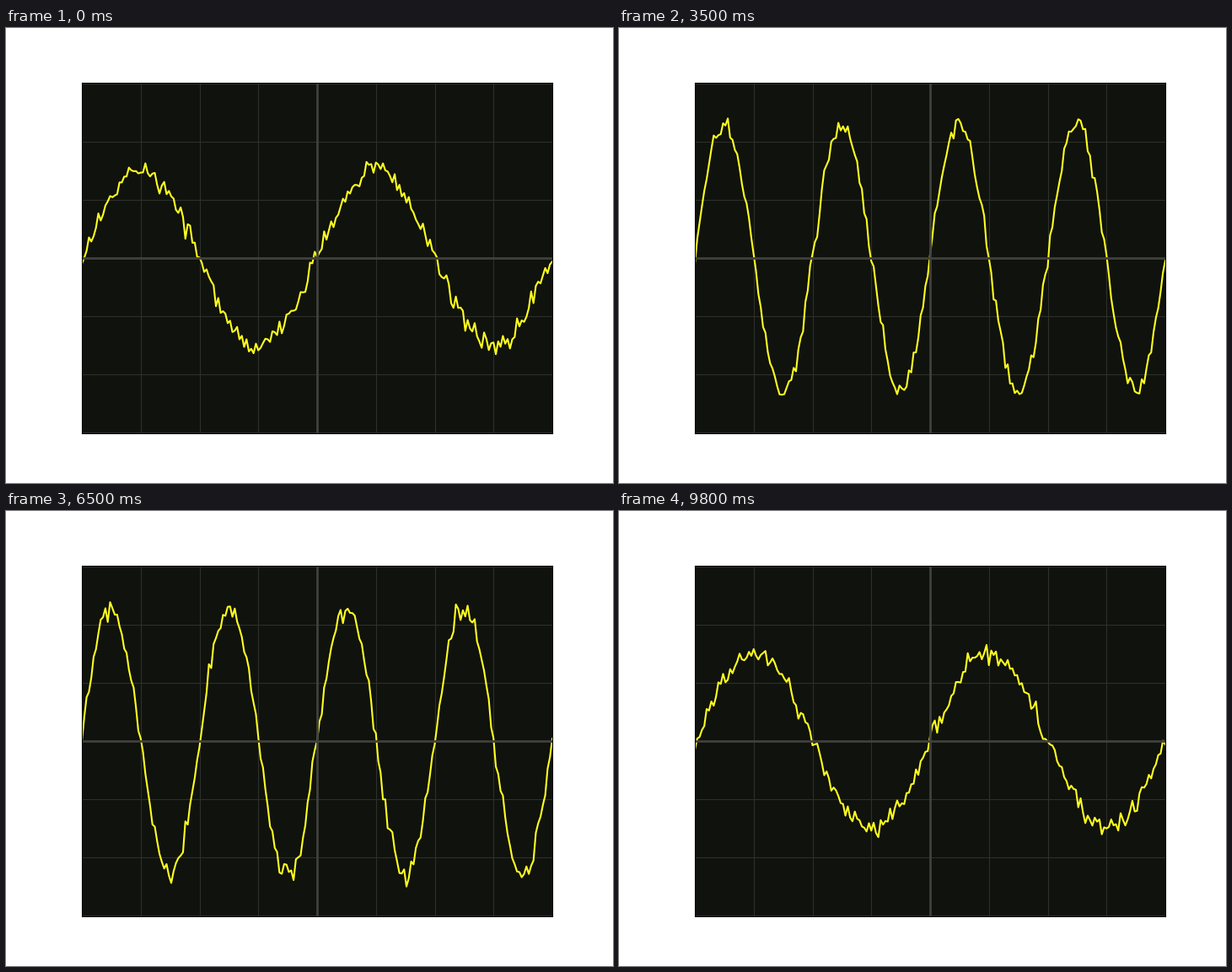
Recreate the animation shown at these times as a matplotlib script. Size 720 by 540 pixels, loop 9.9 s.

```python
import numpy as np
import matplotlib.pyplot as plt
from matplotlib.animation import FuncAnimation

FRAMES = 99
PERIOD = 100      # frames in one swell of the amplitude
NOISE = 0.09
Y_LIMIT = 3.013   # leaves the outer grid lines just inside the border

SCREEN = "#10120d"
GRID = "#2e302c"
AXIS = "#40413d"
TRACE = "#ffff20"

x = np.linspace(-4, 4, 201)


def signal(frame):
    amplitude = 2 - 0.5 * np.cos(2 * np.pi * frame / PERIOD)
    cycles = 4 if 25 <= frame < 75 else 2
    noise = np.random.default_rng(frame + 40).normal(0, NOISE, x.size)
    return amplitude * np.sin(2 * np.pi * cycles * x / 8) + noise


fig, ax = plt.subplots(figsize=(7.2, 5.4), dpi=100, facecolor="white")
fig.subplots_adjust(left=0.125, right=0.9, bottom=0.11, top=0.88)
ax.set_facecolor(SCREEN)
ax.set(xlim=(-4, 4), ylim=(-Y_LIMIT, Y_LIMIT),
       xticks=range(-4, 5), yticks=range(-3, 4))
ax.tick_params(length=0, labelbottom=False, labelleft=False)
ax.grid(color=GRID, linewidth=0.8)
ax.set_axisbelow(True)

trace, = ax.plot(x, signal(0), color=TRACE, linewidth=1.5)

# The centre cross lies over the trace.
ax.axhline(0, color=AXIS, linewidth=2)
ax.axvline(0, color=AXIS, linewidth=2)


def update(frame):
    trace.set_ydata(signal(frame))
    return trace,


anim = FuncAnimation(fig, update, frames=FRAMES, interval=100,
                     repeat=True, repeat_delay=0)
plt.show()
```
